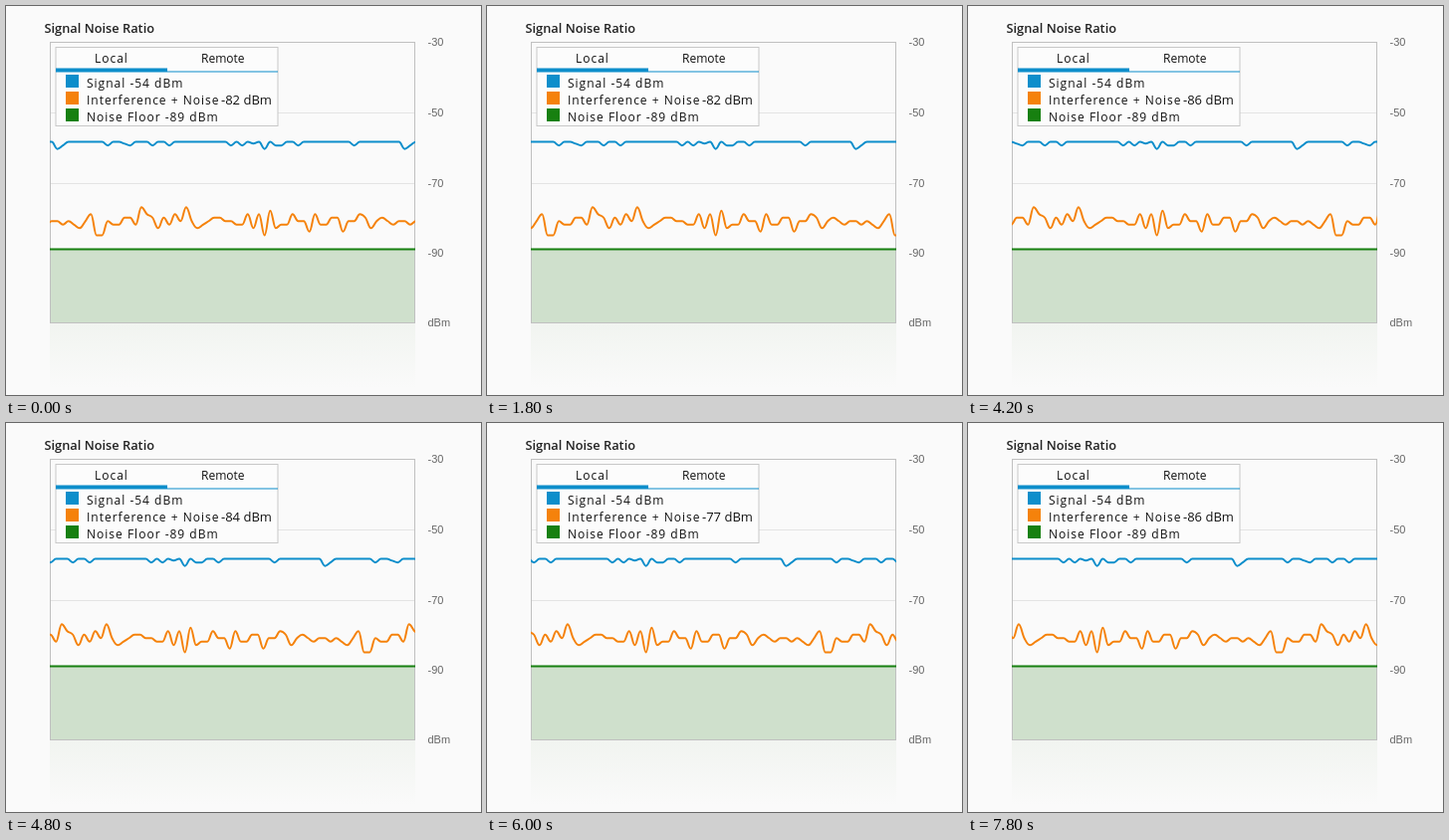
An HTML page for the animation above (8000 ms loop, 477x391 px).

```html
<!DOCTYPE html>
<html lang="en">
<head>
<meta charset="utf-8">
<title>Signal Noise Ratio</title>
<style>
html, body { margin: 0; width: 100%; height: 100%; overflow: hidden; background: #fafafa; }
svg { display: block; width: 477px; height: 391px; }
text { font-family: "Open Sans", sans-serif; font-size: 12px; fill: #111; white-space: pre; }
.title { font-size: 12.8px; font-weight: 600; fill: #222; }
.axis text { font: 11px "Liberation Sans", Arial, sans-serif; fill: #666; }
.wide text { letter-spacing: 1px; }
#level { font-size: 13px; }
.line { fill: none; stroke-width: 2; stroke-linejoin: round; }
</style>
</head>
<body>
<svg viewBox="0 0 477 391">
  <defs>
    <clipPath id="plot"><rect x="44" y="37" width="367" height="282"/></clipPath>
    <linearGradient id="fade" x2="0" y2="1">
      <stop offset="0" stop-color="#f1f4f0"/>
      <stop offset="1" stop-color="#fafafa"/>
    </linearGradient>
  </defs>
  <rect width="477" height="391" fill="#fafafa"/>
  <text class="title" x="38.5" y="27">Signal Noise Ratio</text>
  <rect x="44" y="319" width="367" height="65" fill="url(#fade)"/>
  <path d="M44 107.5H411M44 178.5H411M44 248.5H411" stroke="#e4e4e4"/>
  <rect x="44" y="244" width="367" height="74.5" fill="#cfe0cc"/>
  <rect x="44.5" y="36.5" width="366" height="282" fill="none" stroke="#c0c0c0"/>
  <g class="axis">
    <text x="423.5" y="40">-30</text>
    <text x="423.5" y="111">-50</text>
    <text x="423.5" y="181.5">-70</text>
    <text x="423.5" y="252">-90</text>
    <text x="423.5" y="322">dBm</text>
  </g>
  <g clip-path="url(#plot)">
    <path d="M44 244.4H411" stroke="#178010" stroke-width="2"/>
    <g id="waves">
      <path id="signal" class="line" stroke="#0d8ecb"/>
      <path id="noise" class="line" stroke="#f5820b"/>
    </g>
  </g>
  <rect x="50" y="41.5" width="223" height="79" fill="#fcfcfc" stroke="#c8c8c8"/>
  <rect x="50" y="62.5" width="112" height="4" fill="#0d8ecb"/>
  <rect x="162" y="65.5" width="111" height="1" fill="#0d8ecb"/>
  <text x="196" y="57">Remote</text>
  <g class="wide">
    <text x="89" y="57">Local</text>
    <text x="81" y="81.5">Signal -54 dBm</text>
    <text x="81" y="98.5">Interference + Noise</text>
    <text x="81" y="115.5">Noise Floor -89 dBm</text>
  </g>
  <text id="level" x="216" y="98.5">-82 dBm</text>
  <rect x="60" y="69" width="13" height="13" fill="#0d8ecb"/>
  <rect x="60" y="86" width="13" height="13" fill="#f5820b"/>
  <rect x="60" y="103" width="13" height="13" fill="#178010"/>
</svg>
<script>
const LOOP = 8000, STEP = 600, SHIFT = 10;
const GAP = 5.625, X0 = 85.3, DB = 3.525, COUNT = 62;

const noise = [
  79, 85, 85, 81, 82, 82, 80, 80, 82, 77, 79, 80, 83, 80, 82, 79,
  81, 77, 81, 83, 82, 81, 80, 80, 81, 81, 82, 82, 79, 83, 79, 85,
  78, 83, 82, 82, 79, 81, 81, 84, 79, 82, 82, 80, 80, 84, 81, 81,
  79, 80, 83, 81, 80, 81, 82, 81, 81, 82, 81, 82, 83, 81
];
const dips = { 3: 1, 6: 0.5, 7: 1, 11: 1, 14: 1, 25: 1, 27: 1, 29: 0.5,
  31: 2, 33: 1, 34: 1, 37: 1, 47: 1, 56: 2, 57: 1 };
const levels = [82, 84, 79, 82, 85, 88, 83, 86, 84, 81, 77, 80, 83, 86];

const $ = id => document.getElementById(id);
const wrap = i => (i + COUNT) % COUNT;

// Slope at b, limited so the curve never overshoots its neighbours.
function slope(a, b, c) {
  const rise = (c - a) / 5;
  let left = b - rise;
  if (left > Math.max(a, b)) left = Math.max(a, b);
  if (left < Math.min(a, b)) left = Math.min(a, b);
  let right = 2 * b - left;
  if (right > Math.max(b, c)) right = Math.max(b, c);
  if (right < Math.min(b, c)) right = Math.min(b, c);
  return right - b;
}

function spline(yAt) {
  const x = i => X0 + i * GAP;
  const tilt = i => slope(yAt(i - 1), yAt(i), yAt(i + 1));
  const h = GAP * 0.4;
  let d = `M${x(-9)} ${yAt(-9)}`;
  for (let i = -8; i < 86; i++) {
    d += `C${x(i - 1) + h} ${yAt(i - 1) + tilt(i - 1)} ` +
      `${x(i) - h} ${yAt(i) - tilt(i)} ${x(i)} ${yAt(i)}`;
  }
  return d;
}

$("noise").setAttribute("d", spline(i => 36.5 + (noise[wrap(i)] - 30) * DB));
$("signal").setAttribute("d", spline(i => 136.6 + (dips[wrap(i)] || 0) * DB));

const start = performance.now();
let shown = -1;
function draw() {
  const step = Math.floor(((performance.now() - start) % LOOP) / STEP);
  if (step !== shown) {
    shown = step;
    $("waves").setAttribute("transform", `translate(${-step * SHIFT} 0)`);
    $("level").textContent = `-${levels[step]} dBm`;
  }
  requestAnimationFrame(draw);
}
draw();
</script>
</body>
</html>
```
